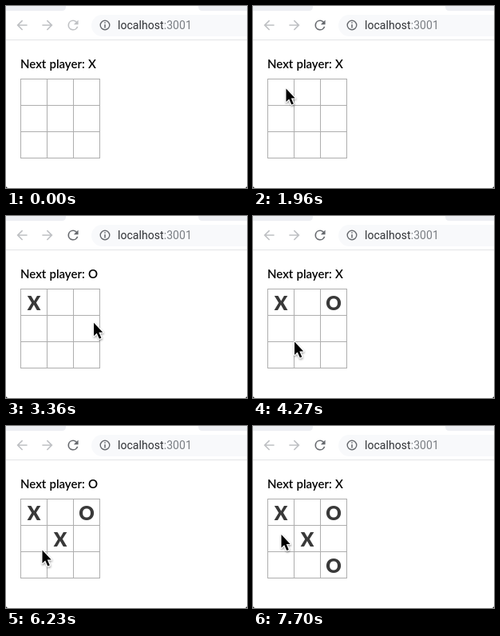
Recreate the animation shown at these times as an HTML page. Size 302 by 228 pixels, loop 8000 ms.

```html
<!DOCTYPE html>
<html lang="en">
<head>
<meta charset="utf-8">
<title>Tic-tac-toe</title>
<style>
  html, body { margin: 0; width: 100%; height: 100%; overflow: hidden; background: #000; }
  svg { display: block; width: 302px; height: 228px; background: #fff; border-radius: 0 0 3px 3px; }
  .url { font: 14px Roboto, Arial, sans-serif; letter-spacing: .05px; fill: #303236; }
  .port { fill: #7b7f84; }
  .status { font: 600 15px Lato, sans-serif; word-spacing: .4px; fill: #000; }
  .mark { font: 900 24px Lato, sans-serif; fill: #393939; text-anchor: middle; }
  .dim { fill: #bfc1c4; }
  .ready { fill: #66696e; }
</style>
</head>
<body>
<svg viewBox="0 0 302 228">
  <defs>
    <path id="arrow" d="M20 11H7.83l5.59-5.59L12 4l-8 8 8 8 1.41-1.41L7.83 13H20z"/>
    <filter id="soft" x="-50%" y="-50%" width="200%" height="200%">
      <feDropShadow dx=".5" dy="1.5" stdDeviation="1" flood-opacity=".4"/>
    </filter>
  </defs>

  <!-- browser chrome -->
  <path fill="#eceef2" d="M0 0H75V1Q75 6 70 6H0ZM241 0H302V6H246Q241 6 241 1Z"/>
  <rect y="42" width="302" height="1" fill="#e3e4e6"/>
  <use href="#arrow" class="dim" transform="translate(10.2 14.2) scale(.82)"/>
  <use href="#arrow" class="dim" transform="translate(61.8 14.2) scale(-.82 .82)"/>
  <path id="reload" class="dim" transform="translate(74.2 14.2) scale(.82)"
    d="M17.65 6.35A7.95 7.95 0 0 0 12 4a8 8 0 1 0 7.73 10h-2.08A6 6 0 1 1 12 6c1.66 0 3.14.69 4.22 1.78L13 11h7V4z"/>
  <rect x="107" y="11" width="220" height="27" rx="13.5" fill="#f8f9fb"/>
  <circle cx="124" cy="24" r="5.8" fill="none" stroke="#66696e" stroke-width="1.4"/>
  <path d="M124 20.3v1.5M124 23v4.5" stroke="#66696e" stroke-width="1.5"/>
  <text class="url" x="140" y="29">localhost<tspan class="port">:3001</tspan></text>

  <!-- game -->
  <text class="status" id="status" x="18" y="78">Next player: X</text>
  <path fill="none" stroke="#aeaeae" d="M18.5 91V191M51.5 91V191M84.5 91V191M117.5 91V191M18 91.5H118M18 124.5H118M18 157.5H118M18 190.5H118"/>
  <g id="board"></g>

  <g id="cursor">
    <path filter="url(#soft)" transform="translate(.5 .5)" stroke="#fff" stroke-width="2" stroke-linejoin="round" paint-order="stroke"
      d="M0 0V16.5L3.7 13L6.8 20L9.3 19L6.3 12H11.2Z"/>
    <circle id="ring" cx="-1" cy="-1.5" r="28.5" fill="none" stroke="#000" stroke-opacity=".7" stroke-width="2"/>
  </g>
</svg>
<script>
const LOOP = 8000, TICK = 70, PRESS = 140, CELL = 33, LEFT = 18, TOP = 91;
const ENTER = { x: 179, y: 30 };

// cursor strokes in order: start and end time, end point, sideways bend
const strokes = [
  { from: 0, to: 700, x: 38, y: 118.5, bend: -.6 },
  { from: 1260, to: 1470, x: 70, y: 115 },
  { from: 1470, to: 1750, x: 33, y: 107.5 },
  { from: 1820, to: 1960, x: 41, y: 103 },
  { from: 2450, to: 2870, x: 97.5, y: 153 },
  { from: 3080, to: 3570, x: 108, y: 115.5, bend: .33 },
  { from: 3710, to: 4270, x: 51.5, y: 157 },
  { from: 4410, to: 4620, x: 70, y: 140.5 },
  { from: 5320, to: 5740, x: 48.5, y: 175 },
  { from: 5810, to: 6230, x: 45, y: 155 , bend: -.5 },
  { from: 6370, to: 6790, x: 103, y: 179.5, bend: -.7 },
  { from: 7140, to: 7700, x: 35, y: 135.5 }
];
// the first press only focuses the window, the others play a cell
const FOCUS = 980;
const plays = [2170, 3640, 4900, 6860];

const $ = id => document.getElementById(id);

function tipAt(t) {
  const i = strokes.findLastIndex(s => t >= s.from);
  const a = strokes[i - 1] || ENTER, b = strokes[i];
  const k = Math.min(1, (t - b.from) / (b.to - b.from));
  const dx = b.x - a.x, dy = b.y - a.y;
  const side = 2 * k * (1 - k) * (b.bend || 0);
  return { x: a.x + dx * k - dy * side, y: a.y + dy * k + dx * side };
}

const marks = plays.map((t, i) => {
  const tip = tipAt(t);
  const col = Math.floor((tip.x - LEFT) / CELL), row = Math.floor((tip.y - TOP) / CELL);
  const text = document.createElementNS("http://www.w3.org/2000/svg", "text");
  text.setAttribute("class", "mark");
  text.setAttribute("x", LEFT + 17 + col * CELL);
  text.setAttribute("y", TOP + 27 + row * CELL);
  text.textContent = "XO"[i % 2];
  return $("board").appendChild(text);
});

const show = (el, on) => el.setAttribute("visibility", on ? "visible" : "hidden");

function draw(now) {
  const t = Math.floor(now % LOOP / TICK) * TICK;
  const tip = tipAt(t);
  $("cursor").setAttribute("transform", `translate(${tip.x} ${tip.y})`);
  $("cursor").style.display = t ? "" : "none";
  show($("ring"), [FOCUS, ...plays].some(p => t >= p && t < p + PRESS));
  $("reload").setAttribute("class", t < FOCUS ? "dim" : "ready");
  const played = plays.filter(p => t >= p + PRESS).length;
  marks.forEach((m, i) => show(m, i < played));
  $("status").textContent = "Next player: " + "XO"[played % 2];
}

const start = performance.now();
function frame() {
  draw(performance.now() - start);
  requestAnimationFrame(frame);
}
frame();
</script>
</body>
</html>
```
